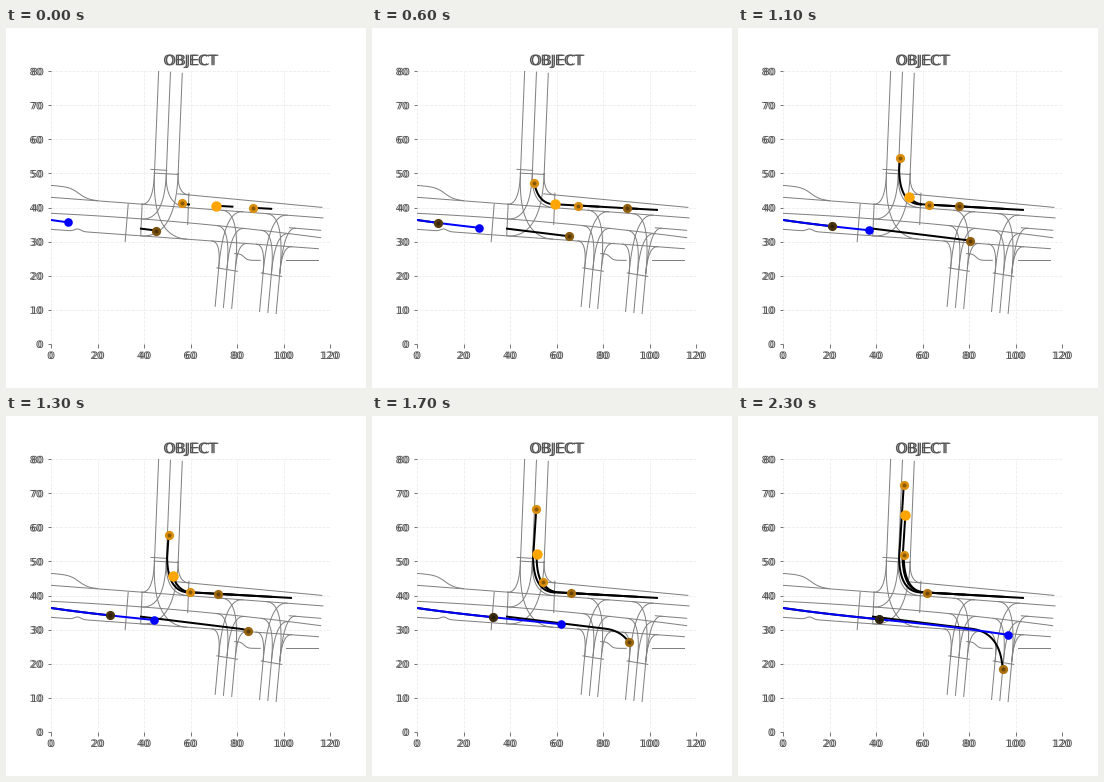
A matplotlib script for the animation above (2.4 s loop, 360 by 360 pixels).

```python
import numpy as np
import matplotlib.pyplot as plt
from matplotlib import patheffects as pe
from matplotlib.animation import FuncAnimation

FRAMES, INTERVAL = 24, 100
INK, LANE = "#555555", "#808080"

plt.rcParams["font.family"] = "DejaVu Sans"
plt.rcParams["font.size"] = 10


def bend(a, c, b, n=40):
    """Quadratic Bezier from a to b with control c."""
    u = np.linspace(0, 1, n)[:, None]
    a, c, b = map(np.array, (a, c, b))
    return (1 - u)**2 * a + 2 * u * (1 - u) * c + u**2 * b


def hermite(t, v, at):
    """Smooth curve through the values v at times t."""
    t, v = np.asarray(t, float), np.asarray(v, float)
    m = np.gradient(v, t, edge_order=2)
    i = np.clip(np.searchsorted(t, at, side="right") - 1, 0, len(t) - 2)
    h = t[i + 1] - t[i]
    u = (at - t[i]) / h
    return (v[i] + (v[i + 1] - v[i]) * u**2 * (3 - 2 * u)
            + h * u * (1 - u) * (m[i] * (1 - u) - m[i + 1] * u))


def step(x, mid, width):
    return 1 / (1 + np.exp((x - mid) / width))


# Lane edges running east, as y(x)
def upper(x): return 47.5 - 0.064 * x
def main(x): return 43.0 - 0.0517 * x
def mid(x): return 38.3 - 0.0324 * x - 0.000252 * x**2
def lower(x): return 33.6 - 0.0494 * x + 0.7 * np.exp(-((x - 11.5) / 1.8)**2)
def verge(x): return main(x) + 3.5 * step(x, 12, 2)
def kerb(x): return 24.5 + 2 * step(x, 83, 0.8)
def island(x): return 39.7 - 0.055 * x


def side_road(x0, gap, lean, y0):
    """Three parallel lane edges running north, as x(y)."""
    return [lambda y, i=i: x0 + gap * i + lean * (y - y0) for i in range(3)]


def turn(line, y, edge, reach):
    """Lane bending from a side road at height y into an east-west edge."""
    e = edge(line(y))
    x = line(e)
    return bend((line(y), y), (x, e), (x + reach, edge(x + reach)))


def build_lanes():
    spans = [(verge, 0, 20), (main, 0, 117), (upper, 54.5, 116.5),
             (mid, 0, 116), (lower, 0, 115), (island, 102.5, 116),
             (kerb, 79, 90), (kerb, 101, 115)]
    for edge, x0, x1 in spans:
        x = np.linspace(x0, x1, 120)
        yield np.column_stack([x, edge(x)])

    north = side_road(44.5, 5.1, 0.06, 50)
    for i, line in enumerate(north):
        y = np.array([50, 80 - 0.3 * i])
        yield np.column_stack([line(y), y])
        yield turn(line, 50, (main, mid, lower)[i], -5 - 5 * i)
        yield turn(line, 50, (lower, main, upper)[i], 15 - 5 * i)

    edges = lower, mid, main
    for x0, y0 in ((70.6, 11), (89.7, 9.5)):
        road = side_road(x0, 3.6, 0.135, y0)
        stop = y0 + 11.3
        for i, line in enumerate(road):
            y = np.array([y0 - 0.3 * i, stop])
            yield np.column_stack([line(y), y])
            yield turn(line, stop, edges[i], -4 - 2 * i)
            yield turn(line, stop, edges[2 - i], 8 - 2 * i)
        yield np.array([(road[0](stop) - 0.8, stop), (road[2](stop) + 0.8, stop - 1)])
    yield turn(road[2], stop, island, 5)

    # Stop lines around the northern crossing
    for a, b in [((33.2, 41), (31.9, 30)), ((39.2, 41), (38.6, 32)),
                 ((59.3, 44.2), (58.8, 35)), ((43, 51.2), (49.8, 50.9)),
                 ((44.3, 50.1), (54.8, 49.7))]:
        yield np.array([a, b])


def north_route(x):
    return np.vstack([(103.2, 39.3), bend((x + 9.5, 40.9), (x + 0.2, 41), (x, 51.1)),
                      (x + 2, 72.4)])


def south_route():
    return np.vstack([(38.7, 33.8), bend((81.8, 30.2), (93.8, 28.8), (94.5, 18)),
                      (94.7, 15)])


def east_route():
    x = np.linspace(0, 110, 200)
    return np.column_stack([x, 36.35 - 0.1 * x + 6.86e-4 * x**2 - 5.15e-6 * x**3])


TIMES = -2, 4, 8, 11, 15, 23


class Car:
    """Follows a route; dist holds the distance covered at each of TIMES."""

    def __init__(self, route, dist, size=9.2, z=3, line="black",
                 fill=None, shade=None):
        self.route, self.dist, self.shade = route, dist, shade
        self.s = np.r_[0, np.cumsum(np.hypot(*np.diff(route, axis=0).T))]
        self.line, = ax.plot([], [], color=line, lw=2, zorder=z)
        self.disc, = ax.plot([], [], "o", color=fill, ms=size, mew=0, zorder=z + 2)
        self.parts = [self.line, self.disc]
        if shade:
            self.parts += ax.plot([], [], "o", ms=4, mew=0, zorder=z + 2)

    def point(self, s):
        return [np.interp(s, self.s, c) for c in self.route.T]

    def update(self, k):
        s = hermite(TIMES, self.dist, k)
        self.line.set_data(*self.point(np.linspace(max(self.dist[0], 0), s, 120)))
        for part in self.parts:
            part.set_visible(s > 1)
        for part, dim in zip(self.parts[1:], (1, 0.62)):
            part.set_data(*[[c] for c in self.point(s)])
            if self.shade:
                a, b = self.shade
                v = a + (b - a) * k / (FRAMES - 1)
                part.set_color(dim * (np.array([0.94, 0.587, 0]) * v + 0.06))
        return self.parts


fig = plt.figure(figsize=(5, 5), dpi=72, facecolor="white")
ax = fig.add_axes([0.125, 0.1226, 0.775, 0.7574])
ax.set(xlim=(0, 120), ylim=(0, 80))
ax.set_xticks(range(0, 121, 20))
ax.set_yticks(range(0, 81, 10))
ax.tick_params(color=INK, labelcolor=INK)
ax.grid(color="#ebebeb", ls="--", lw=0.8)
ax.set_axisbelow(True)
ax.spines[:].set_visible(False)


def double(text, *shifts):
    """Print the text twice, slightly apart."""
    text.set_path_effects([pe.PathPatchEffect((d, 0), facecolor=INK, lw=0)
                           for d in shifts])


double(ax.set_title("OBJECT", fontsize=14.4, color=INK), -0.9, 0.9)
for label in ax.get_xticklabels():
    double(label, -0.9, 0.9)
for label in ax.get_yticklabels():
    double(label, -2, -0.2)

for lane in build_lanes():
    ax.plot(*lane.T, color=LANE, lw=1, zorder=2)

cars = [
    Car(east_route(), (-16, 1.7, 16, 21.2, 29.4, 41.5), shade=(0.36, 0.13)),
    Car(south_route(), (0, 19.8, 33.5, 41.8, 50, 62.4), shade=(0.45, 0.65)),
    Car(north_route(51.95), (8.5, 28.9, 37.5, 40.5, 47.1, 58.5), shade=(0.85, 0.85)),
    Car(north_route(51.95), (-13, 6.5, 19.4, 27.6, 34.5, 41.1), shade=(0.5, 0.68)),
    Car(north_route(49.95), (43.9, 52.6, 58.6, 63, 70, 88), shade=(0.85, 0.85)),
    Car(north_route(51.45), (25.2, 41.8, 45.3, 49.5, 55.9, 70.6),
        size=10.4, z=3.5, fill="#ffa500"),
    Car(east_route(), (-2.5, 22, 30.7, 37.3, 52.7, 97.2),
        size=8.6, z=4, line="blue", fill="blue"),
]


def update(k):
    return [part for car in cars for part in car.update(k)]


anim = FuncAnimation(fig, update, frames=FRAMES, interval=INTERVAL,
                     repeat=True, repeat_delay=0, blit=False)
plt.show()
```
